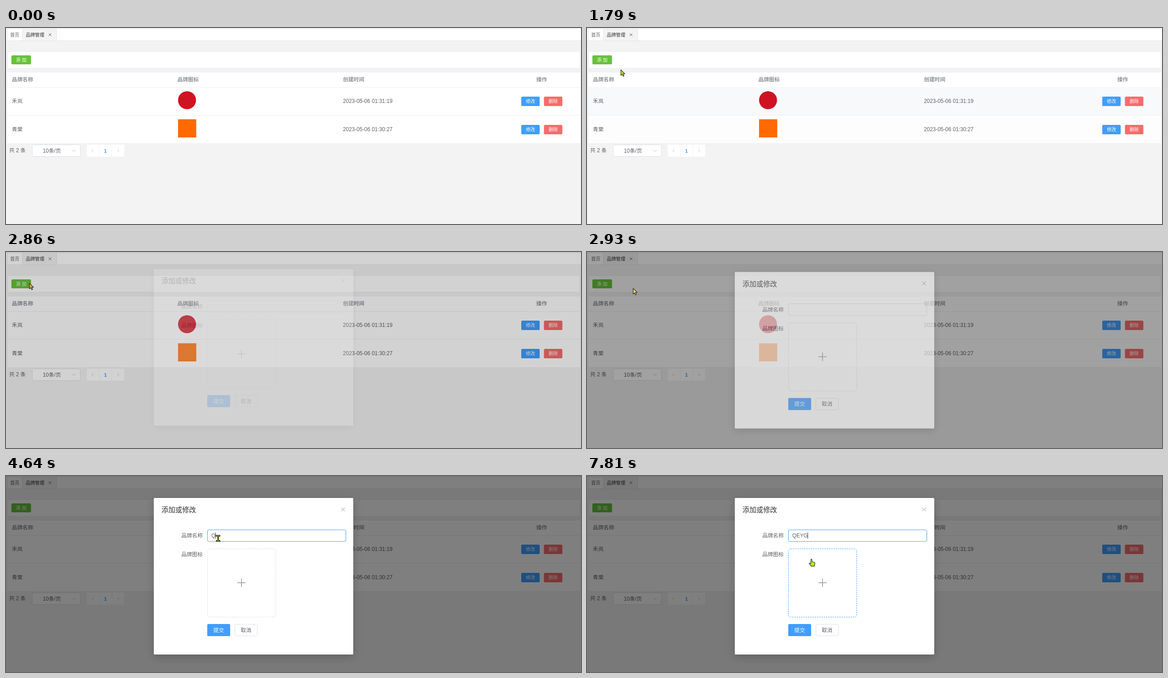
Animation, 1280 px wide and 437 px high, one loop 7.99 s. Source, as an HTML page:

```html
<!DOCTYPE html>
<html lang="zh-CN">
<head>
<meta charset="utf-8">
<title>品牌管理</title>
<style>
html, body { margin: 0; width: 100%; height: 100%; overflow: hidden; background: #f3f3f3; }
svg { display: block; width: 1280px; height: 437px; }
text { font-family: "Liberation Sans", "Noto Sans CJK SC", "Noto Sans CJK", sans-serif; white-space: pre; }
#panel { filter: drop-shadow(0 5px 9px rgba(0, 0, 0, .2)); }
</style>
</head>
<body>
<svg id="stage" viewBox="0 0 1280 437"></svg>
<script>
const LOOP = 7990;
const BODY = 11.9, SMALL = 10.3;
const GREY = '#606266', BLUE = '#409eff', RED = '#f56c6c', EDGE = '#dcdfe6', LINE = '#ebeef5';

const rect = (x, y, w, h, fill, extra = '') =>
  `<rect x="${x}" y="${y}" width="${w}" height="${h}" fill="${fill}" ${extra}/>`;
const path = (d, stroke, extra = '') => `<path d="${d}" fill="none" stroke="${stroke}" ${extra}/>`;
const text = (x, middle, str, size = BODY, fill = GREY, extra = '') =>
  `<text x="${x}" y="${middle + size * .37}" font-size="${size}" fill="${fill}" ${extra}>${str}</text>`;
const centred = (x, middle, str, size, fill, extra = '') =>
  text(x, middle, str, size, fill, `text-anchor="middle" ${extra}`);
const button = (x, y, w, h, fill, label, size = SMALL, id = '') =>
  rect(x, y, w, h, fill, `rx="2.6" id="${id}"`) +
  centred(x + w / 2, y + h / 2, label, size, '#fff', 'font-weight="500"');
const cross = (x, y, r, stroke) =>
  path(`M${x - r} ${y - r}l${2 * r} ${2 * r}m0 ${-2 * r}l${-2 * r} ${2 * r}`, stroke);
const heading = (x, str, anchor = 'start') =>
  text(x, 115, str, BODY, '#909399', `font-weight="700" text-anchor="${anchor}"`);

const row = (id, y, name, time, logo) => {
  const mid = y + 31;
  return rect(3, y, 1275, 63, '#f5f7fa', `id="${id}" opacity="0"`) +
    path(`M3 ${y + 62.5}H1278`, LINE) +
    text(13, mid, name) + logo + text(750, mid, time) +
    button(1147, mid - 10, 41, 21, BLUE, '修改') +
    button(1197.5, mid - 10, 41, 21, RED, '删除');
};

const page =
  rect(0, 0, 1280, 437, '#f3f3f3') +
  rect(0, 1, 1280, 28, '#fff') + rect(37, 1, 75.5, 28, '#f3f3f3') +
  path('M0 1.5H1280M0 28.5H1280M2.5 1V28M36.5 1V28M112.5 1V28', '#e2e5eb') +
  text(9.3, 15, '首页', SMALL) + text(44, 15, '品牌管理', SMALL, '#303133') +
  cross(98, 15, 3, GREY) +
  rect(3.5, 52.5, 1274, 37, '#fff', `stroke="${LINE}" rx="2"`) +
  button(12, 61, 43.7, 20, '#67c23a', '添 加', SMALL, 'add') +
  rect(3, 98, 1275, 160, '#fff') + path('M3 98.5H1278M3 132.5H1278', LINE) +
  heading(13, '品牌名称') + heading(381.5, '品牌图标') + heading(750, '创建时间') +
  heading(1192.5, '操作', 'middle') +
  row('row1', 132, '禾岚', '2023-05-06 01:31:19', '<circle cx="403" cy="161" r="20" fill="#cf1322"/>') +
  row('row2', 195, '青棠', '2023-05-06 01:30:27', rect(383, 203.5, 40.5, 40.5, '#ff6900')) +
  text(7, 273, '共 2 条') +
  rect(58.5, 260.5, 107, 26, '#fff', `rx="3" stroke="${EDGE}"`) +
  text(82, 273.5, '10条/页') + path('M147 271.5l4 4 4-4', '#c0c4cc') +
  [180, 208, 236].map(x => rect(x, 260, 27, 27, '#fff')).join('') +
  path('M194.5 270l-3.5 3.5 3.5 3.5M248 270l3.5 3.5-3.5 3.5', '#c0c4cc') +
  centred(221.3, 273.5, '1', 11.1, BLUE, 'font-weight="700"');

const dialog =
  rect(329, 49, 444, 349, '#fff', 'id="panel" rx="1.7"') +
  text(346, 75.5, '添加或修改', 15.4, '#303133') + cross(750.5, 74.5, 4, '#909399') +
  text(390.3, 133, '品牌名称') + text(390.3, 175, '品牌图标') +
  rect(448.5, 120, 308, 26, '#fff', `id="field" rx="3" stroke="${EDGE}"`) +
  text(457, 133, '', BODY, GREY, 'id="typed"') +
  rect(457, 126, 1, 14, '#303133', 'id="caret"') +
  rect(448.5, 162.5, 152, 152, 'none', 'id="upload" rx="5" stroke="#d9d9d9" stroke-dasharray="3 2"') +
  path('M515 238H533.5M524.3 228.5V247.5', '#8c939d', 'stroke-width="1.5"') +
  button(448, 330, 51, 27, BLUE, '提交', BODY) +
  rect(509.5, 330.5, 50, 26, '#fff', `rx="3" stroke="${EDGE}"`) +
  centred(534.3, 343.5, '取消', BODY, GREY);

const stage = document.getElementById('stage');
stage.innerHTML = page + rect(0, 0, 1280, 437, '#000', 'id="shade"') +
  `<g id="dialog">${dialog}</g>` +
  '<path id="pointer" stroke="#222" stroke-width="1.1" stroke-linejoin="round"/>';

const el = id => document.getElementById(id);
const set = (id, attrs) => {
  for (const key in attrs) el(id).setAttribute(key, attrs[key]);
};

const shapes = {
  arrow: 'M.5.5V13L3.4 10.4L5.6 15L7.7 14L5.6 9.5H9.6Z',
  beam: 'M-4-7H4.5V-4.5H1.5V4.5H4.5V7H-4V4.5H-1V-4.5H-4Z',
  hand: 'M-1 1Q.2-.7 1.5 1V6L7 7.5Q8.5 8 8 10.5L7 16H0L-4.5 10Q-4.5 7.5-1 10.5Z'
};

// Pointer path: time, x, y
const track = [
  [120, 1160, 422], [330, 880, 380], [540, 617, 347], [750, 340, 310], [820, 270, 275],
  [890, 225, 240], [1300, 200, 206], [1510, 200, 206], [1650, 150, 160], [1790, 74, 92],
  [2330, 52, 70], [2860, 51, 69], [2930, 100, 80], [3000, 254, 118], [3140, 380, 138],
  [3420, 436, 138], [3840, 472, 139], [7440, 472, 139], [7810, 501, 188]
];
const tints = [[0, '#c3d62c'], [2660, '#f0a03c'], [2930, '#e8da5c'], [3000, '#dbe59a'],
  [3490, '#8f9a14'], [7510, '#b4f000']];
const typing = [[0, ''], [4640, 'Q'], [5750, 'QE'], [5850, 'QEY'], [6780, 'QEYG']];
const caretOn = [[3700, 4240], [4640, 5100], [5650, 6380], [6780, 7310], [7710, LOOP]];
const bursts = [0, 120, 960, 1580, 2660, 3490, 4240, 5650, 7510];

const clamp = v => Math.min(1, Math.max(0, v));
const ramp = (t, from, to) => clamp((t - from) / (to - from));
const within = (t, from, to) => t >= from && t < to;
const latest = (list, t) => list.filter(item => item[0] <= t).pop()[1];

// The screen refreshes in bursts of roughly 15 pictures per second
const refresh = t => {
  const start = bursts.filter(b => b <= t).pop();
  return Math.min(t, start + Math.floor((t - start) / 66.6) * 69.5);
};

function pointerAt(t) {
  const next = track.findIndex(p => p[0] > t);
  if (next < 0) return track[track.length - 1].slice(1);
  if (next === 0) return track[0].slice(1);
  const [t0, x0, y0] = track[next - 1], [t1, x1, y1] = track[next];
  const k = (t - t0) / (t1 - t0);
  return [x0 + (x1 - x0) * k, y0 + (y1 - y0) * k];
}

function draw(now) {
  const t = refresh(now);
  const [x, y] = pointerAt(t);
  const shape = within(t, 3490, 7510) ? 'beam'
    : within(t, 2230, 2800) || t >= 7600 ? 'hand' : 'arrow';
  set('pointer', {
    d: shapes[shape], fill: latest(tints, t),
    transform: `translate(${x} ${y})`, visibility: now < 120 ? 'hidden' : 'visible'
  });

  set('row1', { opacity: ramp(t, 1640, 1860) * (1 - ramp(t, 1790, 2040)) });
  set('row2', { opacity: ramp(t, 820, 1070) * (1 - ramp(t, 1600, 1850)) });
  set('add', { fill: within(t, 2230, 2800) ? '#85ce61' : '#67c23a' });

  // The dialog slides in with the shade but gains its opacity a little later
  const shown = 1 - (1 - ramp(t, 2814, 3054)) ** 2;
  set('shade', { opacity: shown / 2 });
  set('dialog', { opacity: shown ** 1.6, transform: `translate(0 ${-17 * (1 - shown)})` });

  set('field', { stroke: t >= 3700 ? BLUE : t >= 3490 ? '#c0c4cc' : EDGE });
  set('upload', { stroke: t >= 7600 ? BLUE : '#d9d9d9' });
  el('typed').textContent = latest(typing, now);
  set('caret', {
    x: Math.round(457 + el('typed').getComputedTextLength()),
    visibility: caretOn.some(([a, b]) => within(now, a, b)) ? 'visible' : 'hidden'
  });
}

const begin = performance.now();
function tick() {
  draw((performance.now() - begin) % LOOP);
  requestAnimationFrame(tick);
}
tick();
</script>
</body>
</html>
```
